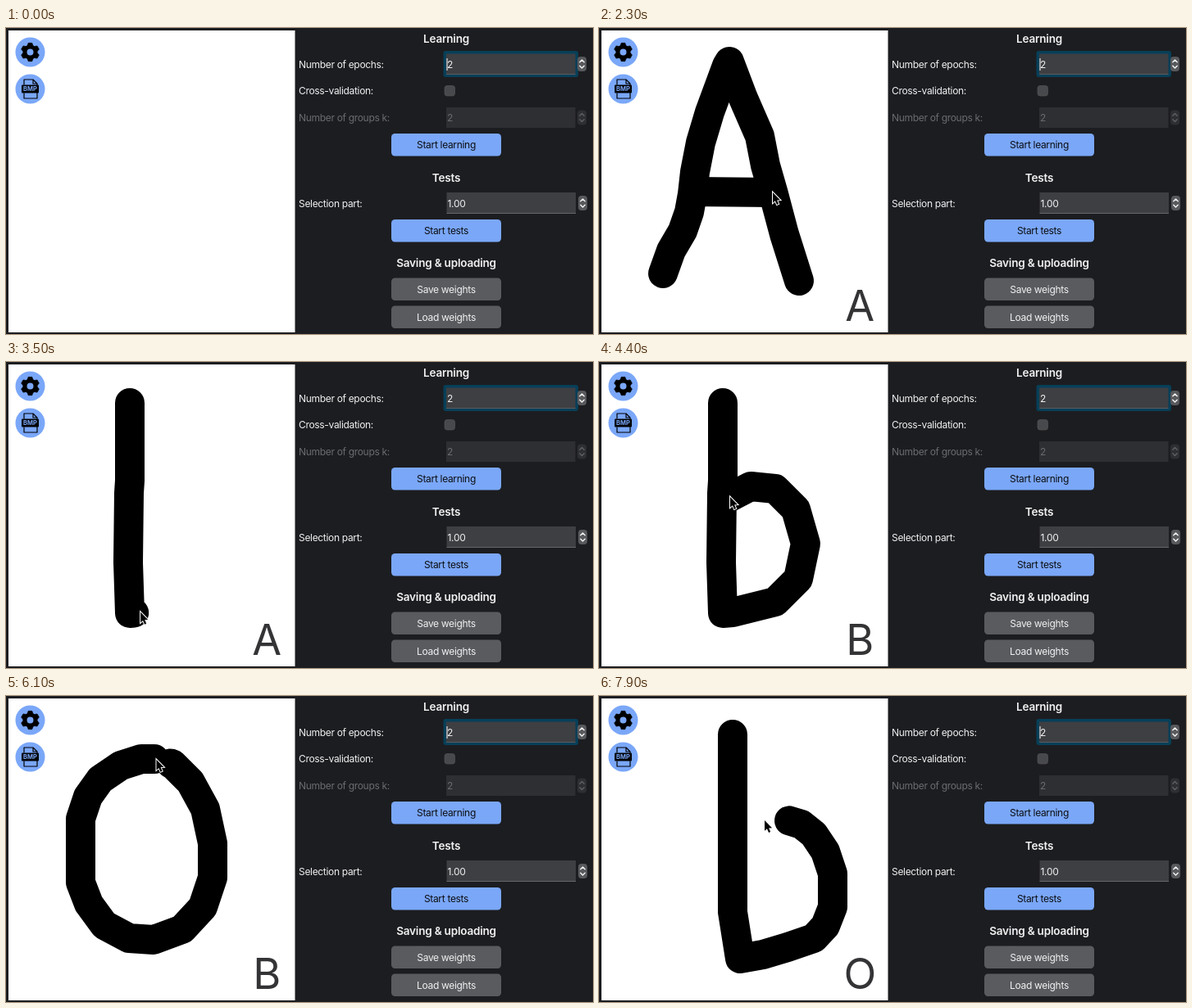
Recreate the animation shown at these times as an HTML page with a canvas. Size 716 by 374 pixels, loop 8000 ms.

```html
<!DOCTYPE html>
<html lang="en">
<head>
<meta charset="utf-8">
<title>Letter recognition</title>
<style>
  html, body { margin: 0; width: 100%; height: 100%; overflow: hidden; background: #1c1d20; }
  svg, canvas { position: absolute; left: 0; top: 0; display: block; }
  text { font-family: Inter, Roboto, sans-serif; font-size: 12px; letter-spacing: -0.32px; fill: #f1f1f2; }
  .head { font-size: 13.5px; font-weight: 600; letter-spacing: -0.2px; text-anchor: middle; }
  .btn { text-anchor: middle; }
  .dark { fill: #0d0e12; }
  .off { fill: #6b6c6f; }
  .bmp { font-size: 7.5px; font-weight: 700; letter-spacing: 0; fill: #7aa7f8; text-anchor: middle; }
  #guess { font-size: 52px; letter-spacing: 0; fill: #343436; text-anchor: middle; }
</style>
</head>
<body>
<svg width="716" height="374" viewBox="0 0 716 374">
  <defs>
    <path id="tooth" d="M-3.7-7.5L-2.3-11.2H2.3L3.7-7.5Z" stroke="#000" stroke-width=".6" stroke-linejoin="round"/>
    <g id="spin">
      <rect width="11" height="18" rx="4" fill="#58595c"/>
      <path d="M2.8 6.8L5.5 4L8.2 6.8M2.8 11.2L5.5 14L8.2 11.2" fill="none" stroke="#f4f4f4"
        stroke-width="1.4" stroke-linecap="round" stroke-linejoin="round"/>
    </g>
  </defs>
  <rect width="716" height="374" fill="#1c1d20"/>
  <rect x="3" y="3" width="349.5" height="369" fill="#fff"/>

  <g transform="translate(29.5 29.5)">
    <circle r="18" fill="#7aa7f8"/>
    <circle r="6.5" fill="none" stroke="#000" stroke-width="5"/>
    <use href="#tooth"/><use href="#tooth" transform="rotate(60)"/><use href="#tooth" transform="rotate(120)"/>
    <use href="#tooth" transform="rotate(180)"/><use href="#tooth" transform="rotate(240)"/><use href="#tooth" transform="rotate(300)"/>
  </g>
  <g transform="translate(29.5 74.5)">
    <circle r="18" fill="#7aa7f8"/>
    <path d="M-7.5-5V-11.5H3.5L8.5-6.5V11.5H-7.5V5M3.5-11.5V-6.5H8.5" fill="none" stroke="#000" stroke-width="1.2" stroke-linejoin="round"/>
    <rect x="-10.5" y="-5" width="21" height="10" rx="1" fill="#000"/>
    <text class="bmp" y="2.8">BMP</text>
  </g>

  <text class="head" x="537" y="18">Learning</text>
  <text x="357" y="48.7">Number of epochs:</text>
  <rect x="533.5" y="28" width="164.5" height="32" rx="3" fill="#073f58"/>
  <rect x="537" y="31.5" width="157.5" height="25.5" fill="#3e3f42"/>
  <path d="M537 56.5H694.5" stroke="#5c5d60"/>
  <text x="538" y="48.7">2</text>
  <rect id="caret" x="537.5" y="37" width="1" height="15" fill="#fff"/>
  <use href="#spin" x="697" y="35"/>

  <text x="357" y="81.2">Cross-validation:</text>
  <rect x="535" y="70.5" width="12.5" height="12.5" rx="3" fill="#48494c" stroke="#59595c" stroke-width=".6"/>

  <text class="off" x="357" y="114">Number of groups k:</text>
  <rect x="537" y="97" width="157.5" height="25" fill="#2e2f32"/>
  <text class="off" x="538" y="114">2</text>
  <use href="#spin" x="697" y="100.5" opacity=".3"/>

  <rect x="470" y="129" width="134" height="27.5" rx="4.5" fill="#7aa7f8"/>
  <text class="btn dark" x="537" y="147.2">Start learning</text>

  <text class="head" x="537" y="187.5">Tests</text>
  <text x="357" y="218.7">Selection part:</text>
  <rect x="537.5" y="201" width="157.5" height="26" fill="#3e3f42"/>
  <path d="M537.5 226.5H695" stroke="#66676a"/>
  <text x="538.5" y="218.7">1.00</text>
  <use href="#spin" x="698" y="205"/>

  <rect x="470" y="234" width="134" height="27.5" rx="4.5" fill="#7aa7f8"/>
  <text class="btn dark" x="537" y="252.2">Start tests</text>

  <text class="head" x="537" y="292">Saving &amp; uploading</text>
  <rect x="470" y="305.5" width="134" height="27.5" rx="4.5" fill="#595b5e"/>
  <text class="btn" x="537" y="323.7">Save weights</text>
  <rect x="470" y="339.5" width="134" height="27.5" rx="4.5" fill="#595b5e"/>
  <text class="btn" x="537" y="357.7">Load weights</text>

  <text id="guess" x="318.3" y="358"></text>
</svg>
<canvas id="pad"></canvas>
<script>
const LOOP = 8000, STEP = 100, W = 352, H = 372, HOP = 350, SETTLE = 60;
const pad = document.getElementById('pad');
const caret = document.getElementById('caret');
const guess = document.getElementById('guess');
const dpr = window.devicePixelRatio || 1;
pad.width = W * dpr;
pad.height = H * dpr;
pad.style.width = W + 'px';
pad.style.height = H + 'px';
const ctx = pad.getContext('2d');

// Pen strokes: start, end and clearing time, pointer lead in px, corner points.
const stroke = (t0, t1, clear, lead, text) => {
  const pts = text.split(' ').map(p => p.split(',').map(Number));
  const at = [0];
  for (let i = 1; i < pts.length; i++) {
    at[i] = at[i - 1] + Math.hypot(pts[i][0] - pts[i - 1][0], pts[i][1] - pts[i - 1][1]);
  }
  return { t0, t1, clear, lead, pts, at, len: at[at.length - 1] };
};
const strokes = [
  stroke(500, 1385, 2600, 24,
    '78,300 88,272 102,248 110,225 114,203 117,176 124,140 135,103 156,46 159,41 176,86 196,132 203,168 213,203 226,252 244,309'),
  stroke(1950, 2250, 2600, 8, '115,200 212,201'),
  stroke(2950, 4090, 4450, 8,
    '151,50 151,145 150,160 149,245 151,307 163,306 215,293 243,265 252,222 240,180 215,155 185,152 160,165'),
  stroke(4940, 6140, 6550, 18,
    '181,77 165,77 140,85 115,102 100,123 91,150 91,228 101,254 120,280 150,296 180,298 215,285 240,258 252,222 252,180 243,138 225,105 203,83 181,77'),
  stroke(7060, 7948, LOOP, 30,
    '163,47 163,264 172,321 200,316 230,307 262,296 276,281 285,258 285,217 276,190 262,169 247,157 231,152 201,152')
];
const guesses = [[1600, 'A'], [4300, 'B'], [6250, 'O']];

const mix = (a, b, k) => [a[0] + (b[0] - a[0]) * k, a[1] + (b[1] - a[1]) * k];
const clamp = k => Math.max(0, Math.min(1, k));

function pointAt(s, d) {
  let i = 1;
  while (i < s.at.length - 1 && s.at[i] < d) i++;
  return mix(s.pts[i - 1], s.pts[i], clamp((d - s.at[i - 1]) / (s.at[i] - s.at[i - 1])));
}

const travelled = (s, t) => s.len * clamp((t - s.t0) / (s.t1 - s.t0));

function drawStroke(s, t) {
  if (t < s.t0 || t >= s.clear) return;
  const d = travelled(s, t);
  ctx.beginPath();
  ctx.moveTo(...s.pts[0]);
  for (let i = 1; i < s.pts.length && s.at[i] < d; i++) ctx.lineTo(...s.pts[i]);
  ctx.lineTo(...pointAt(s, d));
  ctx.lineWidth = 36;
  ctx.lineCap = ctx.lineJoin = 'round';
  ctx.strokeStyle = '#000';
  ctx.stroke();
}

function pointerAt(t) {
  let rest = [16, 240];
  for (const s of strokes) {
    if (t < s.t0) {
      const k = clamp((t - (s.t0 - SETTLE - HOP)) / HOP);
      return mix(rest, s.pts[0], k * k * (3 - 2 * k));
    }
    const d = travelled(s, t);
    rest = pointAt(s, Math.min(s.len, d + Math.min(d, s.lead)));
    if (t < s.t1) return rest;
  }
  return rest;
}

function drawPointer([x, y]) {
  const arrow = [[0, 0], [0, 12.8], [2.9, 10.2], [5, 15], [7.1, 14], [5.1, 9.4], [9, 9.2]];
  ctx.beginPath();
  for (const [dx, dy] of arrow) ctx.lineTo(x + dx, y + dy);
  ctx.closePath();
  ctx.lineWidth = 2;
  ctx.lineJoin = 'miter';
  ctx.strokeStyle = '#fff';
  ctx.stroke();
  ctx.fillStyle = '#000';
  ctx.fill();
}

function render(now) {
  const t = Math.floor((now % LOOP) / STEP) * STEP;
  ctx.setTransform(dpr, 0, 0, dpr, 0, 0);
  ctx.clearRect(0, 0, W, H);
  for (const s of strokes) drawStroke(s, t);
  if (t >= STEP) drawPointer(pointerAt(t));
  const shown = guesses.filter(g => t >= g[0]).pop();
  guess.textContent = shown ? shown[1] : '';
  caret.setAttribute('opacity', (t + 150) % 1000 < 500 ? 1 : 0);
}

let start;
function tick(now) {
  if (start === undefined) start = now;
  render(Math.max(0, now - start));
  requestAnimationFrame(tick);
}
render(0);
requestAnimationFrame(tick);
</script>
</body>
</html>
```
